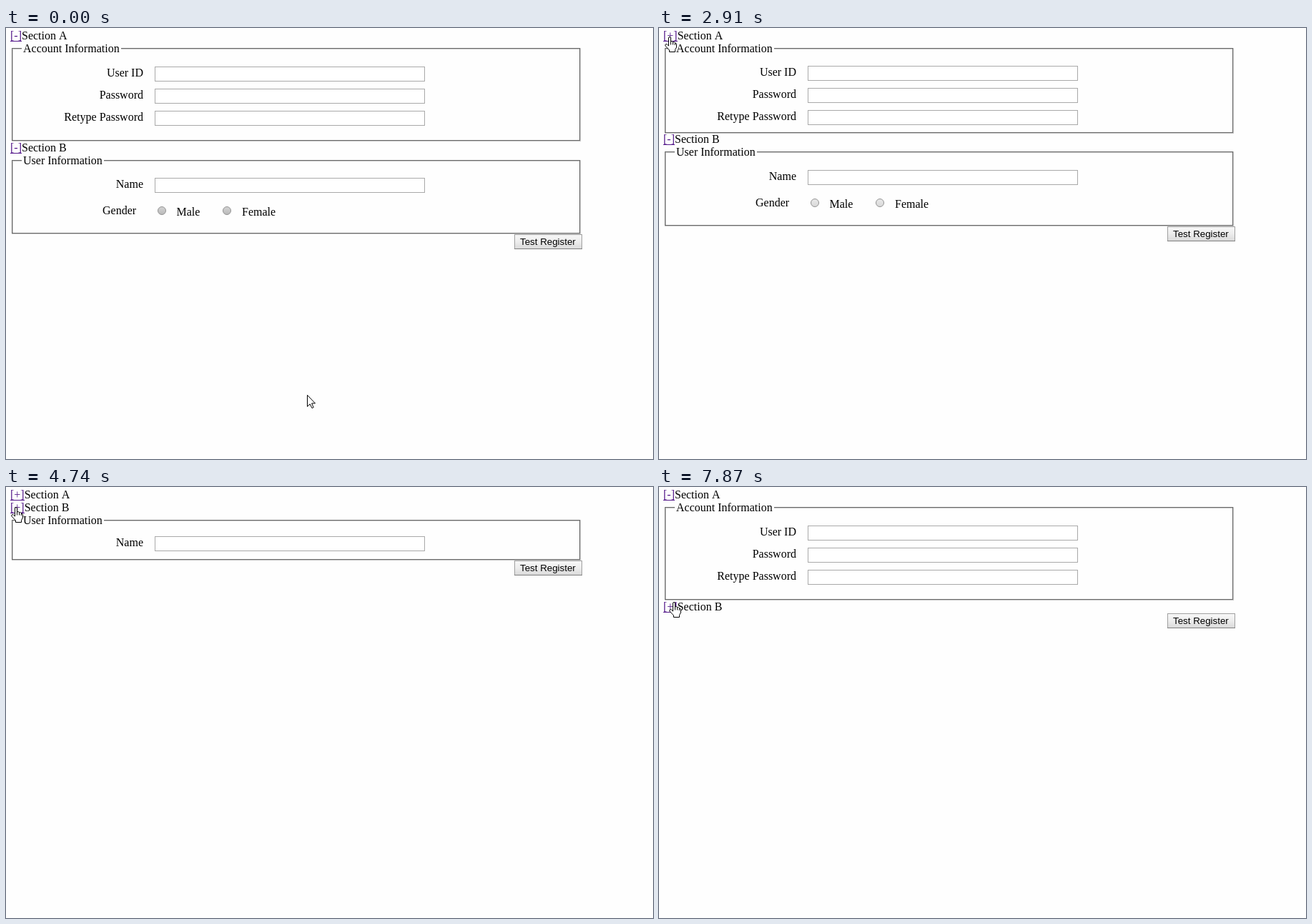
These frames come from a looping animation (905x604 px, 7990 ms). An HTML page with a canvas:

```html
<!DOCTYPE html>
<html lang="en">
<head>
<meta charset="utf-8">
<title>Collapsible form sections</title>
<style>
html, body { margin: 0; width: 100%; height: 100%; overflow: hidden; background: #fefefe; }
canvas { display: block; }
</style>
</head>
<body>
<canvas id="stage" width="905" height="604"></canvas>
<script>
const ctx = document.getElementById('stage').getContext('2d');
const LOOP = 7990, SLIDE = 400;
const SERIF = '16px "Liberation Serif", "Times New Roman", serif';
const SANS = '13.333px "Liberation Sans", Arial, sans-serif';
const PAPER = '#fefefe', LINK = '#551a8b', PRESSED = '#e8128c';
const FULL_A = 139, FULL_B = 112;

const bursts = [
  [530, 1480, 8], [1630, 2450, 7], [2760, 3320, 5], [3880, 4880, 8],
  [5010, 5010, 1], [5590, 6010, 4], [6320, 6740, 4], [7140, 7870, 6]
];

// Pointer moves: start, end, x, y of the hotspot.
const moves = [
  [394, 1480, 103, 187], [1493, 2450, 14, 12], [3737, 4166, 13, 28],
  [5450, 5590, 13, 18], [5590, 6010, 16, 8], [6994, 7870, 20, 161]
];

const clamp = v => Math.max(0, Math.min(1, v));
const swing = p => 0.5 - Math.cos(Math.PI * clamp(p)) / 2;
const slide = (t, start) => swing((t - start) / SLIDE);
const snap = y => Math.floor(y + 0.6);

function sampleTime(t) {
  let s = 0;
  for (const [a, b, n] of bursts) {
    if (t < a) break;
    const step = n > 1 ? (b - a) / (n - 1) : 1;
    s = a + step * Math.min(n - 1, Math.floor((t - a) / step + 0.1));
  }
  return s;
}

function pointerAt(t) {
  let x = 421, y = 514;
  for (const [a, b, toX, toY] of moves) {
    if (t < a) break;
    const p = clamp((t - a) / (b - a)), e = p * 0.5 + swing(p) * 0.5;
    x += (toX - x) * e;
    y += (toY - y) * e;
  }
  return [Math.round(x), Math.round(y)];
}

function rect(x, y, w, h, color) {
  ctx.fillStyle = color;
  ctx.fillRect(x, y, w, h);
}

function text(str, x, y, color = '#000', align = 'left') {
  ctx.fillStyle = color;
  ctx.textAlign = align;
  ctx.fillText(str, x, y);
}

function heading(top, open, name, pressed) {
  const mark = open ? '[-]' : '[+]', color = pressed ? PRESSED : LINK;
  const w = ctx.measureText(mark).width;
  text(mark, 6, top + 14, color);
  rect(6, top + 16, Math.round(w), 1, color);
  text(name, 6 + w, top + 14);
}

function field(label, baseline, top) {
  text(label, 192, baseline, '#000', 'right');
  rect(208, top, 378, 21, '#a9a9a9');
  rect(209, top + 1, 376, 19, '#fff');
}

function radio(x, y, light) {
  const g = ctx.createLinearGradient(0, y - 6, 0, y + 6);
  g.addColorStop(0, light ? '#eaeaea' : '#d6d6d6');
  g.addColorStop(1, light ? '#d8d8d8' : '#b8b8b8');
  ctx.beginPath();
  ctx.arc(x, y, 5.5, 0, Math.PI * 2);
  ctx.fillStyle = g;
  ctx.fill();
  ctx.strokeStyle = '#949494';
  ctx.lineWidth = 1;
  ctx.stroke();
}

function groove(top, bottom) {
  const h = bottom - top, dark = '#6a6a6a', pale = '#c4c4c4';
  rect(8, top, 796, h, pale);
  rect(8, top, 795, 1, dark);
  rect(8, top, 1, h - 1, dark);
  rect(9, bottom - 2, 794, 1, dark);
  rect(802, top + 1, 1, h - 2, dark);
  if (h > 4) rect(10, top + 2, 792, h - 4, PAPER);
}

function clipped(top, bottom, draw) {
  ctx.save();
  ctx.beginPath();
  ctx.rect(0, top, 905, bottom - top);
  ctx.clip();
  draw();
  ctx.restore();
}

function fieldset(y, h, ratio, title, body) {
  if (h < 9) return;
  const top = Math.floor(y), bottom = snap(y + h);
  groove(top + 8, bottom);
  const w = Math.ceil(ctx.measureText(title).width);
  clipped(top, bottom - 2, () => {
    rect(22, top + 8, w + 4, 2, PAPER);
    text(title, 24, top + 14);
    body(snap(y) - Math.round((1 - ratio) * 5 + 0.35));
  });
}

function button(y) {
  const g = ctx.createLinearGradient(0, y, 0, y + 21);
  g.addColorStop(0, '#f8f8f8');
  g.addColorStop(0.5, '#ededed');
  g.addColorStop(1, '#d8d8d8');
  rect(711, y, 95, 21, '#a0a0a0');
  rect(711, y + 20, 95, 1, '#808080');
  rect(712, y + 1, 93, 19, g);
  ctx.font = SANS;
  text('Test Register', 719, y + 15);
  ctx.font = SERIF;
}

const arrow = new Path2D('M.5.5V16.5L4.2 13L7 18.7L9.2 17.7L6.6 12H11.5Z');
const hand = new Path2D('M5.5 13V2Q5.5.5 7 .5T8.5 2V7.5Q9 6.2 10.3 6.6T11.5 8' +
  'Q12.5 7 13.5 7.7T14.3 9.2Q16.5 8.8 16.5 11V15L14.5 18.5V21.5H6.5V19' +
  'L1 13.2Q0 11 2 10.5Q3.5 10.6 5.5 13Z');
const knuckles = new Path2D('M8.5 7V11.5M11.5 8V11.5M14.3 9.2V12');

function pointer(x, y, tB) {
  const inside = (l, t, r, b) => x >= l && x <= r && y >= t && y <= b;
  ctx.save();
  ctx.lineWidth = 1;
  ctx.strokeStyle = '#000';
  ctx.fillStyle = '#fff';
  if (inside(6, 3, 25, 17) || inside(6, tB + 1, 25, tB + 17)) {
    ctx.translate(x - 6, y);
    ctx.fill(hand);
    ctx.stroke(hand);
    ctx.stroke(knuckles);
  } else if (tB > 150 && (inside(24, 178, 135, 195) || inside(135, 248, 182, 265))) {
    const l = x - 3, t = y - 8;
    rect(l, t, 3, 1, '#000');
    rect(l + 4, t, 3, 1, '#000');
    rect(l + 3, t + 1, 1, 14, '#000');
    rect(l, t + 15, 3, 1, '#000');
    rect(l + 4, t + 15, 3, 1, '#000');
  } else {
    ctx.translate(x, y);
    ctx.fill(arrow);
    ctx.stroke(arrow);
  }
  ctx.restore();
}

function draw(t) {
  const openA = t < 2826 || t > 6329, openB = t < 4557;
  const rA = 1 - slide(t, 2826) + slide(t, 6329);
  const rB = 1 - slide(t, 4557);
  const hA = rA * FULL_A, hB = rB * FULL_B, tB = 20 + hA;
  const pressA = (t >= 2760 && t < 2826) || (t >= 6320 && t < 6329);
  const pressB = t > 4400 && t < 4557;

  rect(0, 0, 905, 604, PAPER);
  ctx.font = SERIF;
  heading(2, openA, 'Section A', pressA);
  fieldset(20, hA, rA, 'Account Information', y => {
    field('User ID', y + 48, y + 34);
    field('Password', y + 79, y + 65);
    field('Retype Password', y + 110, y + 96);
  });
  heading(Math.floor(tB), openB, 'Section B', pressB);
  fieldset(tB + 18, hB, rB, 'User Information', y => {
    field('Name', y + 47, y + 33);
    text('Gender', 135, y + 84);
    radio(218, y + 79, !openA);
    text('Male', 238.5, y + 86);
    radio(309, y + 79, !openA);
    text('Female', 330, y + 86);
  });
  button(snap(tB + 18 + hB));
  pointer(...pointerAt(t), Math.floor(tB));
}

const begin = performance.now();
function frame() {
  draw(sampleTime((performance.now() - begin) % LOOP));
  requestAnimationFrame(frame);
}
frame();
</script>
</body>
</html>
```
